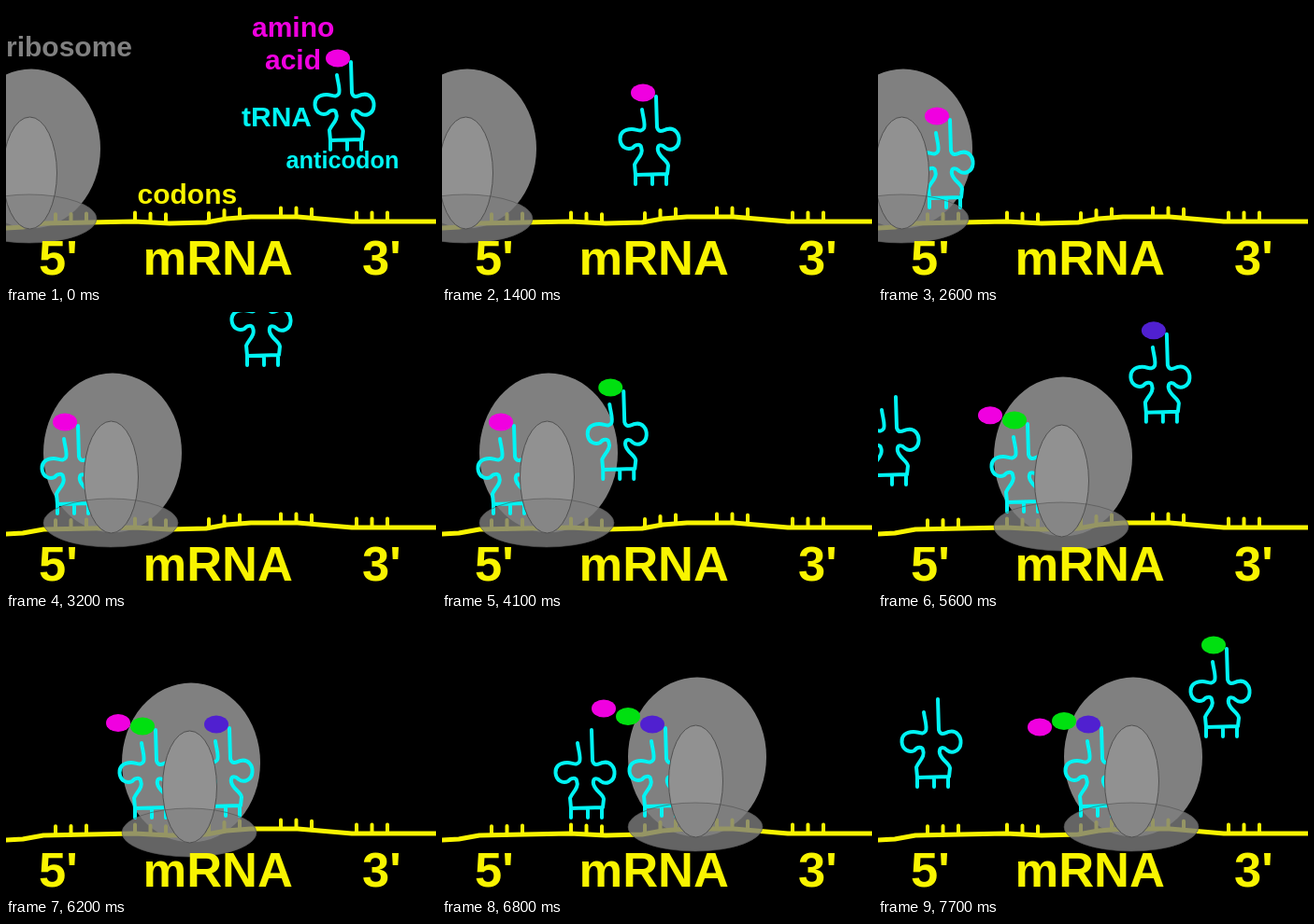
Animation, 460 px wide and 298 px high, one loop 8000 ms. Source, as an HTML page with a canvas:

```html
<!DOCTYPE html>
<html lang="en">
<head>
<meta charset="utf-8">
<title>Translation of mRNA</title>
<style>
html, body { margin: 0; width: 100%; height: 100%; overflow: hidden; background: #000; }
canvas { display: block; }
</style>
</head>
<body>
<canvas id="stage" width="460" height="298"></canvas>
<script>
const ctx = document.getElementById('stage').getContext('2d');
const LOOP = 8000, HOLD = 500, STEP = 300;
const YELLOW = '#f8f400', CYAN = '#00f4f4', PINK = '#f000e0',
      GREEN = '#00e010', PURPLE = '#5020d0', GREY = '#808080';

// Each carrier enters at a step from a point and lands on its codon.
const carriers = [
  { color: PINK, enter: 0, from: [369, 60] },
  { color: GREEN, enter: 10, from: [280, -37] },
  { color: PURPLE, enter: 17, from: [336, -31] },
  { color: GREEN, enter: 24, from: [420, -62] }
];

// Where the ribosome rests, one stop per codon.
const stops = [[0, 0], [87, -2], [171, 2], [246, -4]];

const ground = [[0, 238], [18, 237], [40, 233], [137, 231], [175, 233], [214, 232],
  [236, 228], [262, 226], [312, 226], [370, 231], [460, 231]];
const codonStarts = [53, 138, 217, 294, 375];

const carrierShape = new Path2D(
  'M-15 14 C-14 22 -11 30 -13 34 C-16 39 -20 35 -26 35 C-35 35 -39 40 -38.5 46 ' +
  'C-38 54 -31 58 -25 55 C-22 51 -17 51 -16 54 C-13 62 -20 66 -23 73 L-22 84 ' +
  'M0 0 L1 33 C3 40 8 36 12 35 C20 33 25 40 24.5 47 C24 56 15 59 10 55 ' +
  'C5 50 1 52 2 58 C4 66 12 68 13 74 L12 83 ' +
  'M-22 94 V84 L12 83 M-4 84 V94 M11 83 V94');

const mix = (a, b, f) => a.map((v, i) => v + (b[i] - v) * f);
const clamp = f => Math.min(1, Math.max(0, f));
const shift = (p, x, y) => [p[0] + x, p[1] + y];

const site = i => [77 + 85 * i - 2 * i * i, 122 - 2 * i];
const landing = i => 8 + 6 * i;
const newest = k => Math.floor((k - 8) / 6);
const held = p => shift(p, -14, -4);

function carrierAt(i, k) {
  const { enter, from } = carriers[i];
  if (k < landing(i)) {
    const f = (k - enter) / (landing(i) - enter);
    const bow = 6 * Math.sin(Math.PI * f);
    return shift(mix(from, site(i), f), bow, bow);
  }
  const s = Math.max(0, k - landing(i + 1) - 2);
  return shift(site(i), -23 * s - 3 * s * s, -34 * (1 - Math.exp(-1.2 * s)));
}

// Place of acid i in the chain held by carrier n; the tail sags with time.
function linkAt(i, n, s) {
  const d = n - i, sag = 5 * d * d * clamp((s - 2) / 3);
  return shift(held(site(n)), -26 * d, -8.5 * d + sag);
}

function acidAt(i, k) {
  if (k < landing(i)) return held(carrierAt(i, k));
  const n = newest(k), s = k - landing(n);
  const place = linkAt(i, n, s);
  return n > i ? mix(linkAt(i, n - 1, 6), place, clamp(s / 2)) : place;
}

function ribosomeAt(k) {
  const n = newest(k);
  if (n < 0) return stops[0];
  const f = clamp((k - landing(n)) / 2);
  return shift(mix(stops[n], stops[n + 1], f), 0, 4 * Math.sin(Math.PI * f));
}

function groundAt(x) {
  const i = ground.findIndex(p => p[0] >= x);
  const a = ground[i - 1], b = ground[i];
  return mix(a, b, (x - a[0]) / (b[0] - a[0]))[1];
}

function oval(x, y, rx, ry) {
  const p = new Path2D();
  p.ellipse(x, y, rx, ry, 0, 0, Math.PI * 2);
  return p;
}

function fill(path, color) {
  ctx.fillStyle = color;
  ctx.fill(path);
}

function line(path, color, width) {
  ctx.strokeStyle = color;
  ctx.lineWidth = width;
  ctx.stroke(path);
}

function write(text, x, y, size, color) {
  ctx.font = `bold ${size}px "Liberation Sans", Arial, sans-serif`;
  ctx.fillStyle = color;
  ctx.fillText(text, x, y);
}

function drawStrand() {
  const strand = new Path2D(), ticks = new Path2D();
  ground.forEach(p => strand.lineTo(...p));
  for (const start of codonStarts) {
    for (let i = 0; i < 3; i++) {
      const x = start + 16.5 * i, y = groundAt(x);
      ticks.moveTo(x, y);
      ticks.lineTo(x, y - 9.5);
    }
  }
  line(strand, YELLOW, 5);
  line(ticks, YELLOW, 4);
}

function drawCarrier(x, y) {
  ctx.save();
  ctx.translate(x, y);
  line(carrierShape, CYAN, 4);
  ctx.restore();
}

function drawLabels() {
  write('ribosome', 0, 54, 30, GREY);
  write('amino', 263, 33, 30, PINK);
  write('acid', 277, 68, 30, PINK);
  write('tRNA', 252, 128.5, 30, CYAN);
  write('anticodon', 299.5, 173.5, 25.3, CYAN);
  write('codons', 140.5, 212, 30, YELLOW);
}

function draw(k) {
  ctx.fillStyle = '#000';
  ctx.fillRect(0, 0, 460, 298);
  ctx.lineCap = ctx.lineJoin = 'round';

  const [rx, ry] = ribosomeAt(k);
  const body = oval(27 + rx, 153 + ry, 74, 85.5);
  const base = oval(25 + rx, 228 + ry, 72, 26);
  const core = oval(25.5 + rx, 179 + ry, 29, 60);
  const present = [0, 1, 2, 3].filter(i => k >= carriers[i].enter);

  fill(body, GREY);
  drawStrand();
  fill(base, 'rgba(125,125,125,.8)');
  present.forEach(i => drawCarrier(...carrierAt(i, k)));
  fill(core, '#919191');
  ctx.save();
  ctx.clip(core);
  fill(base, 'rgba(125,125,125,.5)');
  ctx.restore();
  line(core, '#505050', 1);
  line(base, 'rgba(80,80,80,.6)', 1);
  present.forEach(i => fill(oval(...acidAt(i, k), 13, 9.5), carriers[i].color));

  write("5'", 35, 287.5, 52.5, YELLOW);
  write('mRNA', 146.5, 287.5, 52.5, YELLOW);
  write("3'", 381, 287.5, 52.5, YELLOW);
  if (k === 0) drawLabels();
}

const start = performance.now();

function tick() {
  const t = (performance.now() - start) % LOOP;
  draw(t < HOLD ? 0 : 1 + Math.floor((t - HOLD) / STEP));
  requestAnimationFrame(tick);
}

tick();
</script>
</body>
</html>
```
